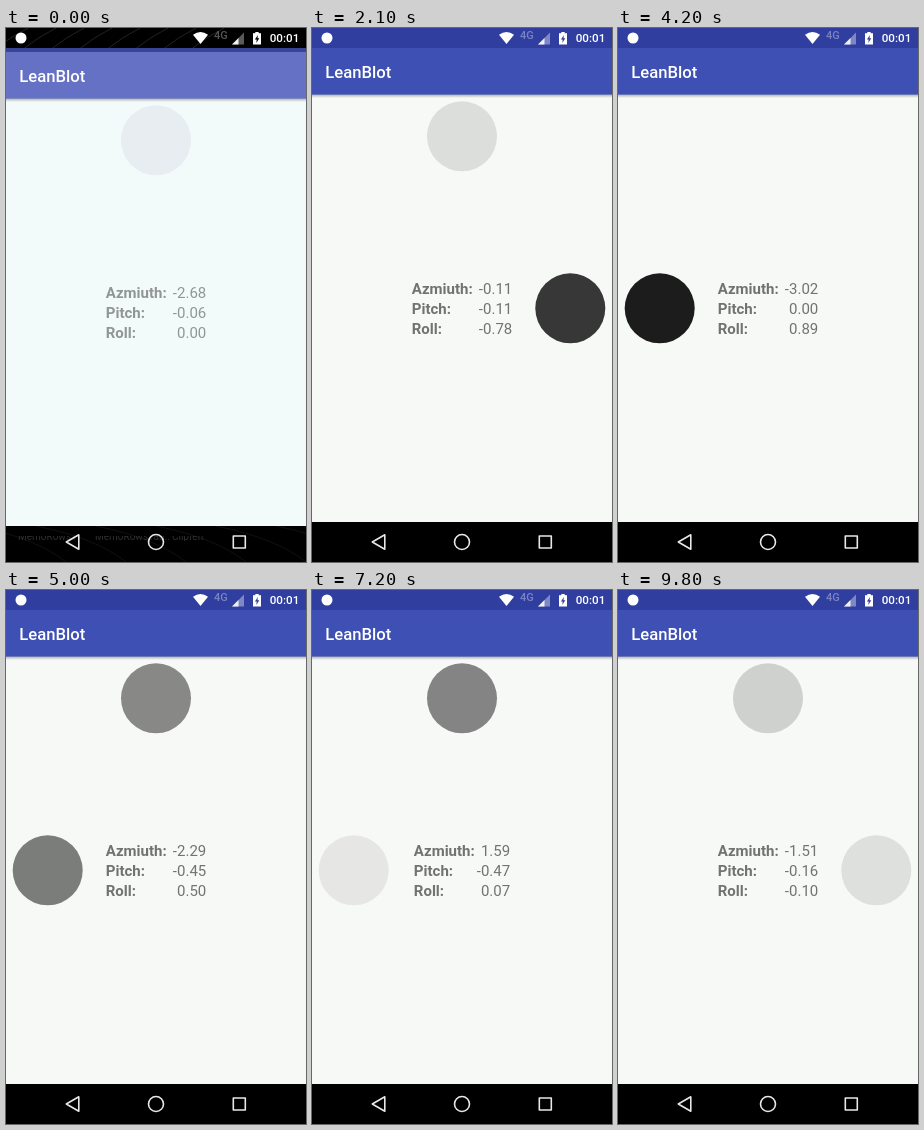
Write an HTML page with a canvas that moves like this. It is 300x534 px and loops after 10 s.

```html
<!DOCTYPE html>
<html lang="en">
<head>
<meta charset="utf-8">
<title>LeanBlot</title>
<style>
html, body { margin: 0; width: 100%; height: 100%; overflow: hidden; background: #000; }
canvas { display: block; width: 300px; height: 534px; }
</style>
</head>
<body>
<canvas id="stage"></canvas>
<script>
const W = 300, H = 534, LOOP = 10000, TAU = Math.PI * 2;
const FONT = 'Roboto, "Noto Sans", sans-serif';
const STATUS = [48, 63, 159];
const canvas = document.getElementById('stage');
const ctx = canvas.getContext('2d');
const dpr = window.devicePixelRatio || 1;
canvas.width = W * dpr;
canvas.height = H * dpr;

// Key poses of the phone: time, azimuth (unwrapped), pitch, roll
const poses = [
  [0, -2.68, -.06, 0],
  [1100, -1.3, -.11, -.06],
  [1700, .06, -.11, -.45],
  [2100, -.11, -.11, -.78],
  [3300, -2.6, -.1, .1],
  [4200, -3.02, 0, .89],
  [5800, -1.57, -.9, .11],
  [7200, 1.59 - TAU, -.47, .07],
  [8800, 2.4 - TAU, .63, .12],
  [9800, -1.51, -.16, -.1]
];

function poseAt(t) {
  const next = poses.findIndex(pose => pose[0] > t);
  if (next < 0) return poses[poses.length - 1].slice(1);
  const a = poses[next - 1], b = poses[next];
  const p = (t - a[0]) / (b[0] - a[0]);
  return a.map((v, i) => v + (b[i] - v) * p).slice(1);
}

const wrap = v => v < -Math.PI ? v + TAU : v;
const deadZone = v => Math.abs(v) < .0499 ? 0 : v;
const mix = (a, b, p) => `rgb(${a.map((v, i) => Math.round(v + (b[i] - v) * p))})`;

function rect(x, y, w, h, fill) {
  ctx.fillStyle = fill;
  ctx.fillRect(x, y, w, h);
}

function disc(x, y, r, fill) {
  ctx.fillStyle = fill;
  ctx.beginPath();
  ctx.arc(x, y, r, 0, TAU);
  ctx.fill();
}

function poly(points, fill) {
  ctx.beginPath();
  points.forEach(([x, y]) => ctx.lineTo(x, y));
  ctx.closePath();
  if (fill) {
    ctx.fillStyle = fill;
    ctx.fill();
  } else ctx.stroke();
}

function text(str, x, y, size, weight, fill, align = 'left') {
  ctx.font = `${weight} ${size}px ${FONT}`;
  ctx.textAlign = align;
  ctx.fillStyle = fill;
  ctx.fillText(str, x, y);
}

function textWidth(str, weight) {
  ctx.font = `${weight} 15px ${FONT}`;
  return ctx.measureText(str).width;
}

function statusIcons(p) {
  disc(15, 10, 5.5, '#fff');
  ctx.fillStyle = '#fff';
  ctx.beginPath();
  ctx.moveTo(194.5, 16);
  ctx.lineTo(187, 6.7);
  ctx.quadraticCurveTo(194.5, 1.3, 202, 6.7);
  ctx.fill();
  text('4G', 208, 11, 11, 500, mix([85, 85, 85], [122, 132, 196], p));
  poly([[226, 16.5], [238, 16.5], [238, 4.5]], mix([90, 90, 90], [126, 136, 198], p));
  poly([[226, 16.5], [232.5, 16.5], [232.5, 10]], '#f0f0f5');
  rect(249.3, 4, 3.4, 2, '#fff');
  rect(247, 5.2, 8, 11.3, '#fff');
  poly([[251.9, 7], [248.9, 11.6], [250.7, 11.6], [250.3, 15], [253.3, 10.3], [251.5, 10.3]],
    mix([0, 0, 0], STATUS, p));
  text('00:01', 293.3, 14.4, 11.67, 500, '#fff', 'right');
}

function wallpaper() {
  ctx.lineWidth = .8;
  ctx.strokeStyle = '#2c2c2c';
  ctx.beginPath();
  for (let i = 0; i < 8; i++) {
    ctx.moveTo(i * 28 - 12, 22);
    ctx.quadraticCurveTo(i * 28 + 4, 9, i * 28 + 22, 0);
  }
  ctx.stroke();
  ctx.strokeStyle = '#161616';
  ctx.beginPath();
  for (let i = 0; i < 6; i++) {
    ctx.moveTo(i * 60 - 30, 498);
    ctx.quadraticCurveTo(30 + i * 60, 510, 60 + i * 60, H);
  }
  ctx.stroke();
  ctx.save();
  ctx.beginPath();
  ctx.rect(0, 508, W, 5);
  ctx.clip();
  ['MemoRowsT', 'MemoRowsTab..', 'Clipfen'].forEach((name, i) =>
    text(name, 12 + i * 77, 512, 10, 400, '#303030'));
  ctx.restore();
}

function navIcons() {
  ctx.strokeStyle = '#e8e8e8';
  ctx.lineWidth = 1.6;
  ctx.lineJoin = 'round';
  poly([[60.3, 514], [72.8, 506.8], [72.8, 521.2]]);
  ctx.beginPath();
  ctx.arc(150, 514, 7.5, 0, TAU);
  ctx.stroke();
  ctx.strokeRect(227.3, 508, 12, 12);
}

function readings(azimuth, pitch, roll, ink) {
  const label = 'Azmiuth:';
  const width = textWidth(label, 700) + 6.2 + textWidth(azimuth.toFixed(2), 400);
  const left = 150 - width / 2, right = 150 + width / 2;
  const rows = [[label, azimuth], ['Pitch:', pitch], ['Roll:', roll]];
  rows.forEach(([name, value], i) => {
    const y = 266.2 + i * 20.1;
    text(name, left, y, 15, 700, ink);
    text(value.toFixed(2), right, y, 15, 400, ink, 'right');
  });
}

function spot(x, y, strength, tint) {
  if (strength <= 0) return;
  ctx.globalAlpha = Math.min(1, strength);
  disc(x, y, 35, tint);
  ctx.globalAlpha = 1;
}

function draw(t) {
  const step = t < 5000 ? 100 : 200;
  t = Math.floor(t / step) * step;
  const [heading, tilt, lean] = poseAt(t);
  const pitch = deadZone(tilt), roll = deadZone(lean);
  const p = Math.min(1, t / 300);

  ctx.setTransform(dpr, 0, 0, dpr, 0, 0);
  rect(0, 0, W, H, '#000');
  if (p < 1) wallpaper();
  rect(0, 0, W, 20, `rgba(${STATUS},${p})`);
  rect(0, 20, W, 4, mix([58, 68, 150], STATUS, p));

  // The app window slides up and fades in
  ctx.save();
  ctx.translate(0, 4 * (1 - p));
  rect(0, 20, W, 474, mix([243, 250, 250], [247, 249, 246], p));
  const shade = ctx.createLinearGradient(0, 66, 0, 70);
  shade.addColorStop(0, 'rgba(0,0,0,.32)');
  shade.addColorStop(1, 'rgba(0,0,0,0)');
  rect(0, 66, W, 4, shade);
  rect(0, 20, W, 46.6, mix([101, 113, 196], [62, 80, 180], p));
  if (p < 1) rect(0, 16, W, 4, mix([58, 68, 150], STATUS, p));
  text('LeanBlot', 13.3, 50, 16.67, 500, '#fff');

  const tint = mix([45, 35, 105], [0, 2, 0], p);
  spot(150, 108.3, -pitch, tint);
  spot(150, 452.3, pitch, tint);
  spot(41.7, 280.3, roll, tint);
  spot(258.3, 280.3, -roll, tint);
  readings(wrap(heading), pitch, roll, mix([146, 149, 149], [114, 115, 113], p));
  ctx.restore();

  statusIcons(p);
  navIcons();
}

const start = performance.now();
function tick() {
  draw((performance.now() - start) % LOOP);
  requestAnimationFrame(tick);
}
tick();
</script>
</body>
</html>
```
